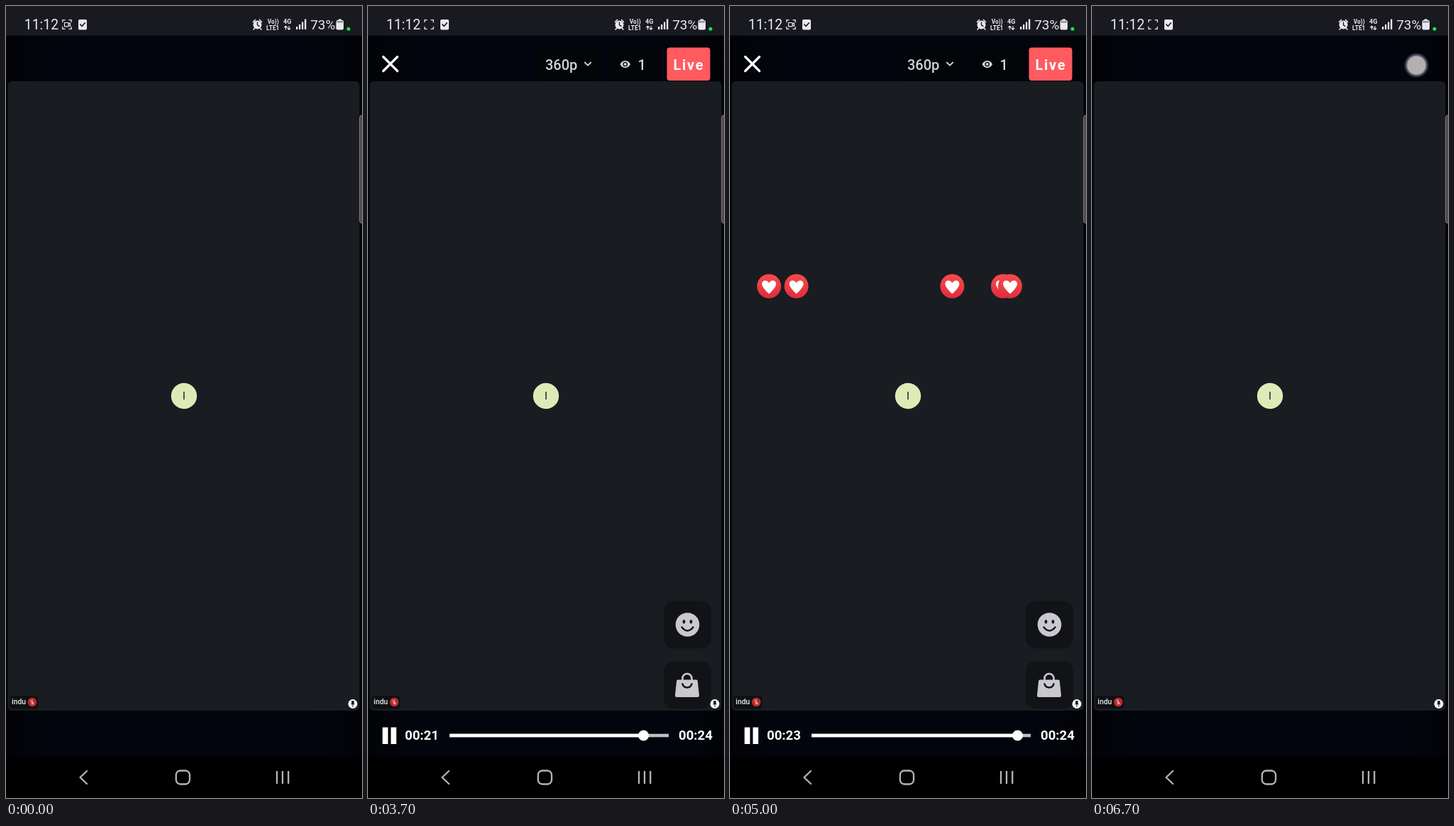
These frames come from a looping animation (502x1115 px, 6.8 s). An HTML page:

```html
<!DOCTYPE html>
<html lang="en">
<head>
<meta charset="utf-8">
<title>Live stream reactions</title>
<style>
  html, body { margin: 0; width: 100%; height: 100%; overflow: hidden; background: #000; }
  svg { display: block; width: 100vw; height: 100vh; font-family: Roboto, sans-serif; }
  .line { fill: none; stroke-linecap: round; stroke-linejoin: round; }
  .tiny { font-size: 8.4px; font-weight: 700; }
  .med { font-size: 20px; font-weight: 500; }
  .time { font-size: 18.6px; font-weight: 700; }
</style>
</head>
<body>
<svg viewBox="0 0 502 1115" preserveAspectRatio="none">
  <defs>
    <linearGradient id="app" x2="1" y2="0">
      <stop offset="0" stop-color="#020307"/><stop offset=".15" stop-color="#02050d"/>
      <stop offset=".85" stop-color="#02050d"/><stop offset="1" stop-color="#020307"/>
    </linearGradient>
    <linearGradient id="red" x2="0" y2="1">
      <stop offset="0" stop-color="#f84b4c"/><stop offset="1" stop-color="#df2c3c"/>
    </linearGradient>
    <linearGradient id="blue" x2="0" y2="1">
      <stop offset="0" stop-color="#4a90dc"/><stop offset="1" stop-color="#3674c2"/>
    </linearGradient>
    <radialGradient id="halo">
      <stop offset=".68" stop-color="#d4d8e8" stop-opacity=".75"/>
      <stop offset="1" stop-color="#7882a0" stop-opacity="0"/>
    </radialGradient>
    <clipPath id="stage"><path d="M0 42H502V1057H0Z"/></clipPath>
    <path id="love" d="M0 9.5C-4 6-10-.5-10-4.5C-10-10-3-11 0-5.8C3-11 10-10 10-4.5C10-.5 4 6 0 9.5Z"/>
    <g id="badge">
      <circle r="17" fill="url(#red)"/>
      <use href="#love" y="1.3" fill="#fff"/>
    </g>
  </defs>

  <rect width="502" height="1115" fill="url(#app)"/>
  <rect x="2.5" y="106" width="496" height="886" rx="6" fill="#191c20"/>

  <circle cx="251" cy="549" r="18.2" fill="#e0eab8"/>
  <text x="251" y="553.5" font-size="14" font-weight="500" fill="#3b4033" text-anchor="middle">I</text>

  <rect x="5" y="971" width="40" height="18" rx="4" fill="#0e1013"/>
  <text x="8" y="983" font-size="10.4" font-weight="500" fill="#ececec">indu</text>
  <circle cx="37" cy="980" r="6.3" fill="#b9282c"/>
  <path class="line" d="M37 976.8V980M35 980.5Q37 983.5 39 980.5M37 982.2V983.5M34.2 977L39.8 983" stroke="#f1c8c8" stroke-width="1"/>
  <circle cx="489" cy="982.5" r="6.5" fill="#fff"/>
  <path d="M487 978.3H491L490.6 981.5L492 983.3H486L487.4 981.5ZM488.5 983H489.5V987H488.5Z" fill="#15171a"/>

  <g id="controls">
    <path class="line" d="M21.5 71.5L41.5 91.5M41.5 71.5L21.5 91.5" stroke="#fff" stroke-width="3.2"/>
    <g fill="#020408">
      <rect x="238.500" y="59" width="88" height="47" rx="5"/>
      <rect x="337" y="59" width="74" height="47" rx="5"/>
    </g>
    <g class="med" fill="#d3d4da">
      <text x="250" y="90">360p</text>
      <text x="380.500" y="90">1</text>
    </g>
    <path class="line" d="M305.800 79.500L310 83.700L314.200 79.500" stroke="#d3d4da" stroke-width="1.8"/>
    <path d="M355.500 82C358.500 75.300 367 75.300 370 82C367 88.700 358.500 88.700 355.500 82Z" fill="#d3d4da"/>
    <circle cx="362.700" cy="82" r="3.3" fill="#020408"/>
    <circle cx="362.700" cy="82" r="2" fill="#d3d4da"/>
    <rect x="421.500" y="58.500" width="61" height="46.500" rx="4" fill="#ff5a5f"/>
    <text x="430.500" y="90" font-size="20" font-weight="700" letter-spacing="1.7" fill="#fff">Live</text>

    <g fill="#111317">
      <rect x="417" y="837.500" width="67" height="67" rx="14"/>
      <rect x="417" y="922.500" width="67" height="67" rx="14"/>
    </g>
    <circle cx="450.500" cy="871" r="16.800" fill="#c9c8cf"/>
    <g fill="#111317">
      <ellipse cx="445.500" cy="866.800" rx="1.900" ry="2.700"/>
      <ellipse cx="455.500" cy="866.800" rx="1.900" ry="2.700"/>
    </g>
    <path class="line" d="M442.500 874.500Q450.500 884.500 458.500 874.500" stroke="#111317" stroke-width="2.400"/>
    <path d="M437 948.500H463Q464.500 948.500 464.800 950L467 970.500Q467 973 464.500 973H435.500Q433 973 433 970.500L435.200 950Q435.500 948.500 437 948.500Z" fill="#c9c8cf"/>
    <path class="line" d="M443.500 949V946.500A6.500 6.500 0 0 1 456.500 946.500V949" stroke="#c9c8cf" stroke-width="2.600"/>
    <path class="line" d="M443.500 954.500A6.800 7 0 0 0 456.500 954.500" stroke="#111317" stroke-width="2.600"/>

    <path d="M20.500 1015.500H28.200V1039H20.500ZM32.300 1015.500H40V1039H32.300Z" fill="#fff"/>
    <text id="clock" class="time" x="52" y="1033.300" fill="#fff">00:19</text>
    <text class="time" x="438" y="1033.300" fill="#fff">00:24</text>
    <rect x="115" y="1024.700" width="309" height="4.600" fill="#bfbfc4"/>
    <rect id="played" x="115" y="1024.700" width="246" height="4.600" fill="#fff"/>
    <circle id="knob" cy="1027" r="7.500" fill="#fff"/>
  </g>

  <g id="picker">
    <g transform="translate(207 788)">
      <circle r="17" fill="#fdc648"/>
      <use href="#love" fill="#e8383f" transform="translate(-7.500 -5) rotate(-8) scale(.7)"/>
      <use href="#love" fill="#e8383f" transform="translate(7.500 -5) rotate(8) scale(.7)"/>
      <path d="M-9 4Q0 7 9 4Q8 13 0 13Q-8 13-9 4Z" fill="#5c3a22"/>
      <path d="M-5 11Q0 7.500 5 11Q0 14-5 11Z" fill="#ee5a52"/>
    </g>
    <g transform="translate(258 788)">
      <circle r="17" fill="#fdc648"/>
      <path class="line" d="M-10-8L-4-4.500L-10-1.500M10-8L4-4.500L10-1.500" stroke="#5c3a22" stroke-width="2"/>
      <path d="M-10 2H10Q9 13 0 13Q-9 13-10 2Z" fill="#5c3a22"/>
      <path d="M-8.500 2.500H8.500V5H-8.500Z" fill="#fff"/>
      <path d="M-6 10.500Q0 7 6 10.500Q0 15-6 10.500Z" fill="#ee5a52"/>
      <path d="M-10 2Q-9 13-15 13.500Q-22 12-18.500 6.500Q-16 3-10 2ZM10 2Q9 13 15 13.500Q22 12 18.500 6.500Q16 3 10 2Z" fill="#65b7ed"/>
    </g>
    <g transform="translate(308 788)">
      <circle r="17" fill="url(#blue)"/>
      <path d="M-10-1H-5V9H-10ZM-4-1L-.5-4L.5-9.500Q3.500-10.500 4-6.500L3.300-2H8.500Q11-2 10.500.5L8.500 7.500Q8 9 6 9H-1L-4 8Z" fill="#fff"/>
    </g>
    <g transform="translate(357 786)">
      <path d="M-8-7L8 9L-17.500 16Z" fill="#f8b62d"/>
      <path d="M-11 0L2 11M-14 7L-6 13" stroke="#df6c36" stroke-width="3"/>
      <ellipse rx="11.500" ry="4" transform="translate(0 1) rotate(45)" fill="#b9552b"/>
      <g class="line" stroke-width="2">
        <path d="M-12-17Q-15-15-12-12Q-9-10-12-7" stroke="#48b45c"/>
        <path d="M-3-7Q3-12-1-18" stroke="#48b45c"/>
        <path d="M3-3Q3-10 8-11Q12-14 10-18" stroke="#3c8ee0"/>
        <path d="M8 3Q12-1 17 3" stroke="#e63e46"/>
        <path d="M0 14L4 10L7 13" stroke="#3c8ee0"/>
        <path d="M8-6Q12-9 16-8" stroke="#48b45c"/>
      </g>
      <g fill="#e63e46">
        <circle cx="-5" cy="-16" r="1.600"/><circle cx="16" cy="-17" r="1.600"/>
        <circle cx="13" cy="13" r="1.700"/><circle cx="-18" cy="4" r="1.500"/>
      </g>
      <g fill="#3c8ee0"><circle cx="-2" cy="-18" r="1.500"/><circle cx="17" cy="8" r="1.500"/></g>
    </g>
    <g transform="translate(411 788)" class="line">
      <path d="M-9-5L3 10M-3-9L9 5M-11 1L-2 12" stroke="#fcc547" stroke-width="8"/>
      <path d="M-6-2L8 9M12-5L9 7" stroke="#fcc547" stroke-width="9"/>
      <path d="M-9-7L2 4M-13-1L-3 8M-11 5L-3 12M3-6L12 3" stroke="#d99723" stroke-width="1.300"/>
      <path d="M1-12L-1-16M7-11L8-16M12-9L15-13" stroke="#f2ae35" stroke-width="1.700"/>
    </g>
    <use href="#badge" x="462" y="788"/>
  </g>

  <g id="hearts" clip-path="url(#stage)"></g>

  <g id="touch">
    <circle r="18" fill="url(#halo)"/>
    <circle r="12.800" fill="#b5b1b2" fill-opacity=".9"/>
  </g>

  <rect width="502" height="41.500" fill="#191920"/>
  <g fill="#e9e9ed">
    <text x="25.800" y="32.800" font-size="19.400">11:12</text>
    <text x="429.200" y="32.800" font-size="19">73%</text>
    <rect x="102" y="19" width="12" height="14.500" rx="1.800"/>
    <g class="tiny">
      <text x="368.800" y="25">Vo))</text>
      <text x="367" y="34">LTE1</text>
      <text x="391" y="25.300" font-size="9">4G</text>
    </g>
    <path d="M409 29H411.300V33H409ZM413 26H415.300V33H413ZM417 22.500H419.300V33H417ZM421 18.500H423.300V33H421Z"/>
    <path d="M468.500 18.500H473V20H474Q476 20 476 22V31.500Q476 33.500 474 33.500H467.500Q465.500 33.500 465.500 31.500V22Q465.500 20 467.500 20H468.500Z"/>
    <circle cx="354.500" cy="26.500" r="6"/>
  </g>
  <path d="M466.500 21.200H475V23.500H466.500Z" fill="#888890"/>
  <g class="line" stroke="#e9e9ed" stroke-width="1.300">
    <path d="M79.800 22.500V19.700H83M89 19.700H92.200V22.500M92.200 29.500V32.300H89M83 32.300H79.800V29.500"/>
    <path d="M348.500 22.500L351.500 19.500M360.500 22.500L357.500 19.500M350.500 31.500L349 33M358.500 31.500L360 33" stroke-width="1.700"/>
    <path d="M394.500 33V28.500M392.700 30L394.500 28.300L396.300 30M399 28.500V33M397.200 31.500L399 33.200L400.800 31.500" stroke-width="1.200"/>
    <path id="camera" d="M82.500 23.500H88V28.800H82.500ZM88 25.500L90.500 24V28.300L88 27" stroke-width="1.200"/>
  </g>
  <g class="line" stroke="#191920" stroke-width="1.700">
    <path d="M104.800 26L107.200 28.500L111.300 23.800"/>
    <path d="M354.500 23V26.800L357 28.300" stroke-width="1.400"/>
  </g>
  <circle cx="483" cy="32.300" r="2.500" fill="#10ee45"/>

  <rect x="498.500" y="153.500" width="12" height="152.500" rx="4" fill="#514b4d" stroke="#777274"/>

  <rect y="1057" width="502" height="58" fill="#000"/>
  <g class="line" stroke="#b5b5b5" stroke-width="2.300">
    <path d="M114 1077L104.500 1086L114 1095"/>
    <rect x="239.800" y="1076.500" width="19.200" height="19" rx="6"/>
    <path d="M382 1077V1095M390 1077V1095M398.200 1077V1095" stroke-linecap="butt"/>
  </g>
</svg>
<script>
  const LOOP = 6800;
  const TRACK = { x: 115, width: 309, seconds: 24.1 };

  // Horizontal paths: position, velocity and curve; painted back to front.
  const PATHS = [
    [49, 6.95, -0.3],
    [93, 0.5, 0.2],
    [368, -13.4, -52.4],
    [444, -74.6, 10],
    [438, -99.9, 57.9]
  ];
  const RISE = [890, -591.4, 46];

  const $ = id => document.getElementById(id);
  const show = (el, on) => { el.style.display = on ? '' : 'none'; };
  const within = (t, a, b) => t >= a && t < b;
  const curve = ([p, v, c], s) => p + v * s + c * s * s;
  const place = (el, x, y) => el.setAttribute('transform', `translate(${x} ${y})`);

  const ui = {};
  for (const id of ['controls', 'clock', 'played', 'knob', 'picker', 'hearts', 'touch', 'camera']) ui[id] = $(id);

  const hearts = PATHS.map(() => {
    const el = document.createElementNS('http://www.w3.org/2000/svg', 'use');
    el.setAttribute('href', '#badge');
    return ui.hearts.appendChild(el);
  });

  function drawPlayer(t) {
    const x = 361 + 13.1 * (t - 1.6);
    const played = x - TRACK.x;
    const sec = Math.round(played / TRACK.width * TRACK.seconds);
    ui.played.setAttribute('width', played);
    ui.knob.setAttribute('cx', x);
    ui.clock.textContent = '00:' + String(sec).padStart(2, '0');
  }

  function drawHearts(t) {
    const s = t - 4.1;
    const y = curve(RISE, s);
    hearts.forEach((el, i) => place(el, curve(PATHS[i], s), y));
  }

  function draw(t) {
    const tapHeart = within(t, 2.75, 3.1);
    show(ui.controls, within(t, 0.3, 5.9));
    show(ui.picker, within(t, 2.3, 3.15));
    show(ui.hearts, within(t, 3.7, 5.88));
    show(ui.touch, tapHeart || t >= 6.55);
    show(ui.camera, (t + 0.22) % 1 < 0.5);
    ui.touch.style.opacity = tapHeart ? 0.5 : 1;
    place(ui.touch, tapHeart ? 462 : 457.5, tapHeart ? 791 : 83.5);
    drawPlayer(t);
    drawHearts(t);
  }

  function tick() {
    draw(performance.now() % LOOP / 1000);
    requestAnimationFrame(tick);
  }
  tick();
</script>
</body>
</html>
```
